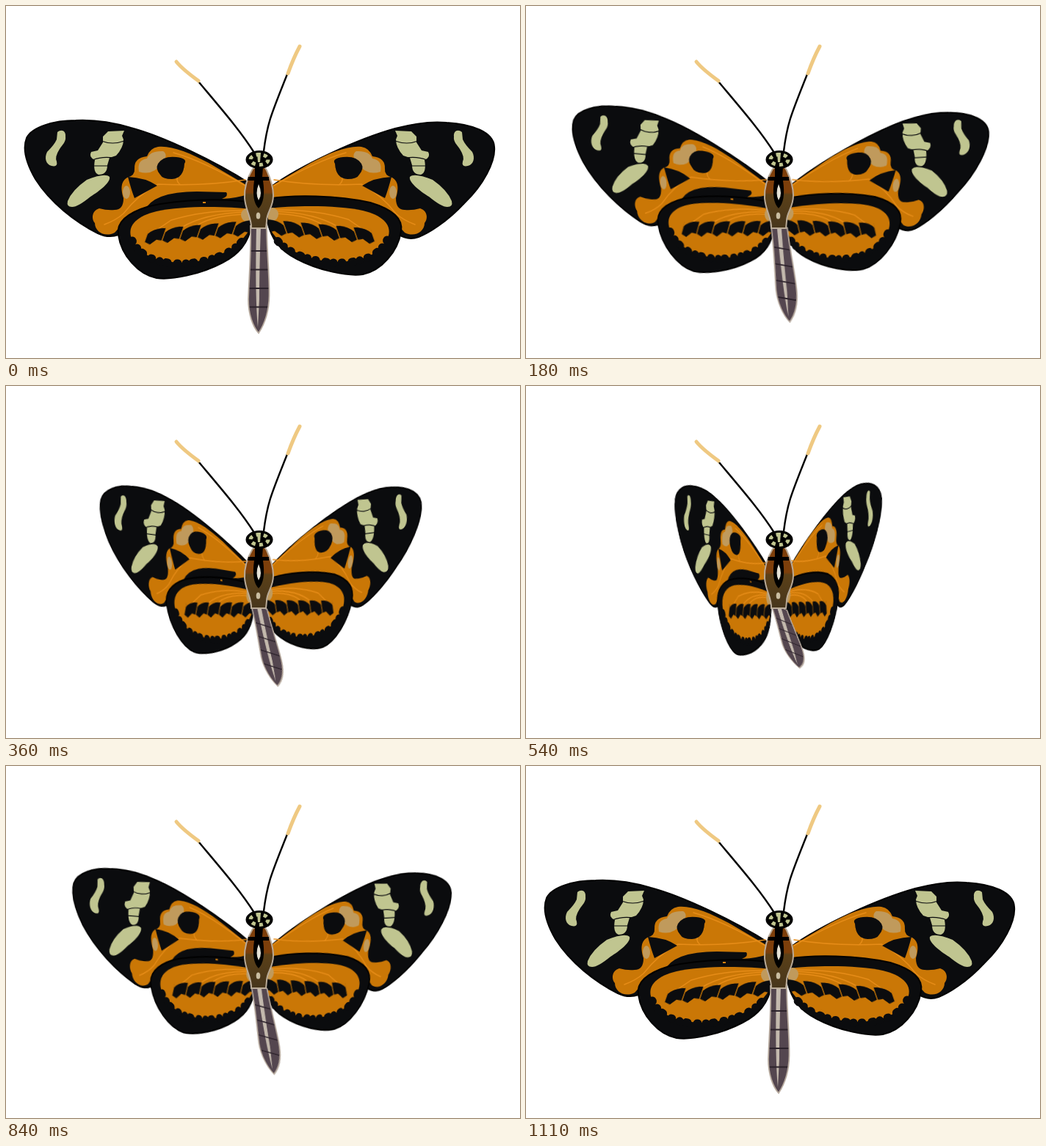
An HTML page without scripts for the animation above (1.2 s loop, 700 px wide and 480 px high).

```html
<!DOCTYPE html>
<html lang="en">
<head>
<meta charset="utf-8">
<title>Butterfly</title>
<style>
html, body { margin: 0; width: 100%; height: 100%; overflow: hidden; background: #fff; }
svg { display: block; width: 700px; height: 480px; }

/* One wing stroke down, then the same stroke in reverse. */
.left, .right, .tail { animation: 600ms -1ms infinite alternate; }
.left {
  transform-origin: 270px 268px; animation-name: flap;
  --lift: matrix(.965, .1, .03, 1, 4, -5);
  --half: matrix(.785, .064, .055, 1.005, 17, -4);
  --shut: matrix(.405, .0975, .055, 1.01, 36, -1);
}
.right {
  transform-origin: 362px 250px; animation-name: flap;
  --lift: matrix(.97, -.065, -.05, 1, -5, 1);
  --half: matrix(.79, -.05, -.1, 1, -1, -1);
  --shut: matrix(.4, -.106, -.075, 1.03, -3, 2);
}
.tail {
  transform-origin: 344px 303px; animation-name: flap;
  --lift: matrix(1, .08, .035, .98, 1, 0);
  --half: matrix(1, .28, .14, .82, 1, 0);
  --shut: matrix(1, .4, .19, .57, 1, 0);
}
@keyframes flap {
  0% { transform: matrix(1, 0, 0, 1, 0, 0); animation-timing-function: steps(1); }
  15% { transform: var(--lift); animation-timing-function: steps(2); }
  45% { transform: var(--half); animation-timing-function: steps(3); }
  90%, 100% { transform: var(--shut); }
}

.edge { fill: #0b0c0e; stroke: #000; stroke-width: 2; stroke-linejoin: round; }
.ink { fill: #0b0c0e; }
.orange { fill: #ca7706; }
.tan { fill: #c09a5c; }
.pale { fill: #c0c590; }
.vein, .cut, .line, .tip, .teeth, .rings, .marks { fill: none; stroke-linecap: round; }
.vein { stroke: #e68c18; stroke-width: 1.5; }
.cut { stroke: #0b0c0e; stroke-width: 1.2; }
.line { stroke: #000; stroke-width: 2.4; }
.tip { stroke: #efc982; stroke-width: 5; }
.teeth { stroke: #0b0c0e; stroke-width: 11; stroke-dasharray: 1 11 0 9 2 13; }
.rings { stroke: #2c222b; stroke-width: 30; stroke-linecap: butt; stroke-dasharray: 2 23.5; }
.marks { stroke: #c0c590; stroke-width: 5; stroke-linecap: butt; stroke-dasharray: 5 5.2; }
</style>
</head>
<body>
<svg viewBox="0 0 700 480">
  <defs>
    <linearGradient id="coat" x1="0" y1="0" x2="0" y2="1">
      <stop offset=".42" stop-color="#7d3f0b"/>
      <stop offset=".46" stop-color="#5b4018"/>
      <stop offset="1" stop-color="#46351c"/>
    </linearGradient>
    <pattern id="spots" width="24" height="24" patternUnits="userSpaceOnUse">
      <path class="ink" d="M.7 19V8Q8 0 23.300 2V19L16 17L9 23Z"/>
    </pattern>
    <path id="belly" d="M333 300H355C355 330 359 370 358.500 395C358 420 350 437 344 446C336 437 330 420 330 400C331 370 334 335 333 300Z"/>
    <clipPath id="inside"><use href="#belly"/></clipPath>

    <g id="fore">
      <path class="orange" d="M334 248L276 214C250 200 225 190 207 192Q196 194 192 205Q174 207 175 222Q176 231 165 234C155 240 157 252 160 262Q160 278 148 278Q138 279 127 276C117 279 116 290 121 296C121 308 135 316 148 309L160 296L334 280Z"/>
      <path class="vein" d="M326 245Q270 212 228 200M326 237Q270 246 207 243Q180 257 160 283Q150 292 134 298M242 222Q226 236 238 244"/>
      <path class="tan" d="M181 226Q178 210 192 208Q196 197 214 198Q222 203 212 215Q200 232 181 226Z"/>
      <ellipse class="tan" cx="164" cy="254" rx="5" ry="9"/>
      <path class="ink" d="M166 233Q190 234 206 245L175 262Q171 252 166 233ZM207 215Q214 204 232 206Q248 208 243 215Q242 235 226 236Q213 236 210 230Q203 222 207 215Z"/>
      <path class="pale" d="M70 172C76 167 82 171 81 178C82 185 77 189 73 195Q66 206 69 212Q71 220 62 218C54 216 52 207 56 199Q66 189 69 182Z"/>
      <path class="pale" d="M132 178L139 171L161 170L158 177L160 182Q160 193 150 204L141 207L138 217Q138 230 126 230Q118 227 121 210Q112 206 116 199L125 197L132 186Z"/>
      <path class="cut" d="M130 184Q145 190 161 184M118 210Q130 205 146 207M118 218H140"/>
      <path class="pale" d="M110 237Q135 227 141 233C143 240 128 252 115 260Q98 274 90 274Q82 274 84 266Q90 251 110 237Z"/>
    </g>
    <path id="rim" class="edge" d="M334 268C300 262 240 263 195 273C165 282 150 295 153 312C157 340 180 366 205 371C225 374 265 366 295 350C315 340 330 325 334 300Z"/>
    <g id="hind">
      <path id="field" class="orange" d="M334 277C300 273 240 272 205 280C180 286 166 298 170 314C182 345 215 350 245 350C285 347 320 330 334 300Z"/>
      <path class="vein" d="M328 279Q270 278 225 292L200 309M326 281Q270 283 239 302M327 284Q285 285 262 298"/>
      <ellipse class="tan" cx="328" cy="285" rx="8" ry="9"/>
      <rect width="144" height="24" fill="url(#spots)" transform="matrix(1 -.09 -.35 1 195 303)"/>
      <path class="teeth" d="M172 320C185 346 215 352 245 351C285 348 315 334 328 312"/>
    </g>
  </defs>

  <g class="left">
    <path class="edge" d="M332 242C285 212 215 178 170 166C140 157 115 155 95 156C65 156 35 165 28 180C22 195 28 215 40 236C60 268 95 295 125 310Q140 317 153 312L160 290L332 275Z"/>
    <use href="#fore"/>
    <path class="ink" d="M188 280Q200 253 260 253L300 254Q304 259 294 263Q315 262 332 256V280Z"/>
    <use href="#rim"/>
    <use href="#hind"/>
    <rect x="268" y="267" width="4" height="2" fill="#d9820f"/>
  </g>

  <g class="right">
    <path class="edge" d="M360 247C403 216 480 181 530 167C560 159 580 157 600 159C635 161 664 172 665 192C667 212 650 244 625 268C600 295 575 310 562 315Q548 320 535 312L530 290L360 275Z"/>
    <g transform="matrix(-1 0 0 1 691 0)">
      <use href="#fore"/>
      <use href="#rim" y="-5"/>
      <use href="#hind" y="-1"/>
    </g>
  </g>

  <g class="tail">
    <use href="#belly" fill="#54464f"/>
    <path d="M341 300H347Q345 360 345 400L343 438Q339 400 341 300Z" fill="#c3b9ad"/>
    <path class="rings" d="M344 333V434" clip-path="url(#inside)"/>
    <use href="#belly" fill="none" stroke="#b7aa9e" stroke-width="1.800"/>
  </g>

  <path d="M336 222Q350 214 355 224C360 235 364 245 364 258C364 275 355 281 355 293L354 303H334C335 290 326 278 325 262C324 245 330 232 336 222Z" fill="url(#coat)" stroke="#b9aa98" stroke-width="2"/>
  <path d="M339 220H350L349 233H358V238H350Q354 266 344 276Q334 266 338 238H329L330 233H339Z"/>
  <path d="M344 243Q350 256 344 265Q339 256 344 243Z" fill="#e4e2d6"/>
  <ellipse cx="343.500" cy="286" rx="2.800" ry="4.500" fill="#c9bda2"/>

  <path class="line" d="M338 200C320 171 293 140 262 103M351 198C356 158 362 146 383 93"/>
  <path class="tip" d="M232 76Q240 86 262 102M400 55Q391 72 384 92"/>
  <ellipse cx="345" cy="209.500" rx="18.500" ry="12.500"/>
  <ellipse class="marks" cx="345" cy="209.500" rx="12" ry="7"/>
  <path class="pale" d="M342 200H347L346 213H343Z"/>
</svg>
</body>
</html>
```
